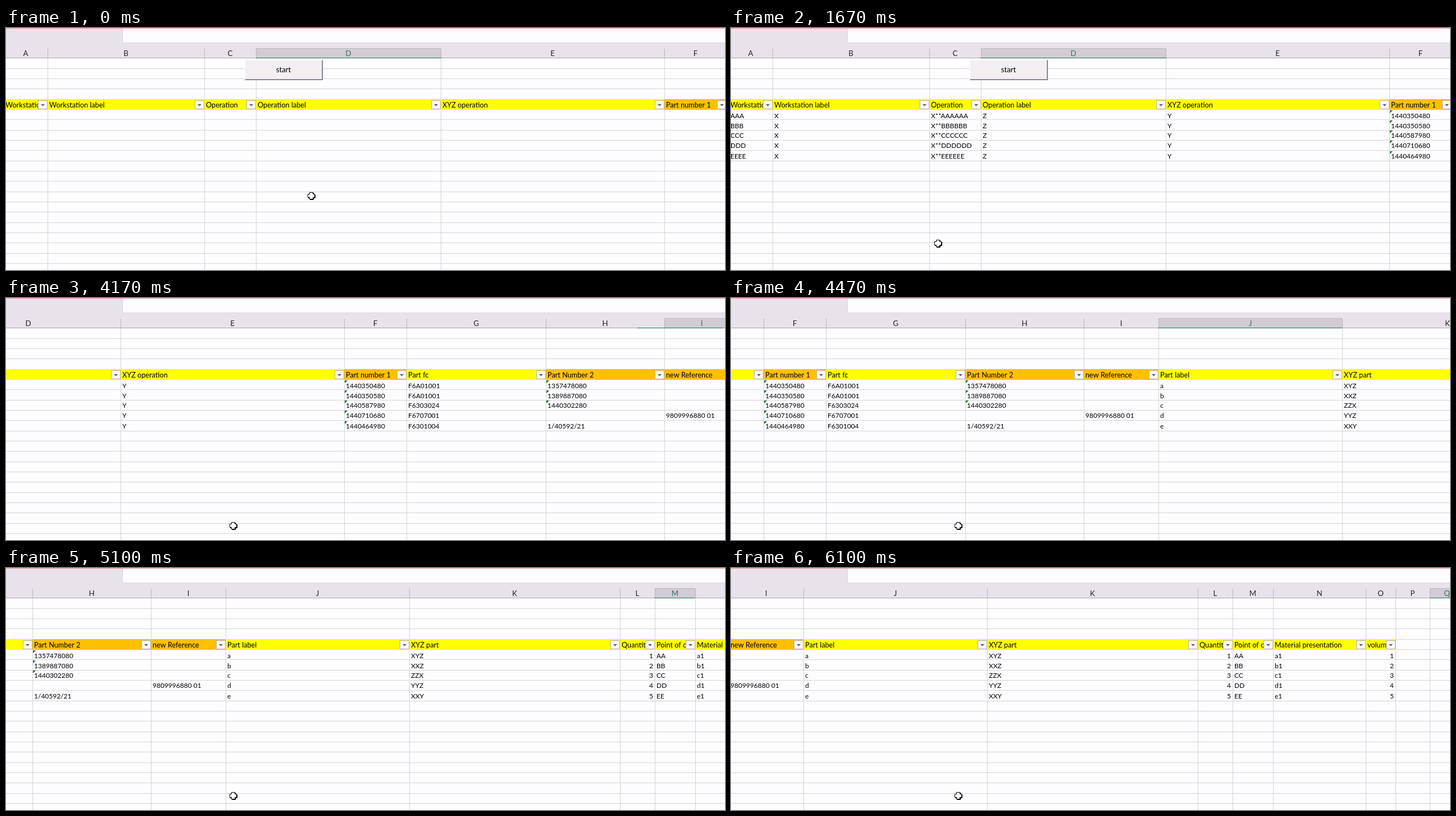
Animation, 1280 px wide and 432 px high, one loop 7090 ms. Source, as an HTML page with a canvas:

```html
<!DOCTYPE html>
<html lang="en">
<head>
<meta charset="utf-8">
<title>Worksheet</title>
<style>
html, body { margin: 0; width: 100%; height: 100%; overflow: hidden; background: #fdfcff; }
canvas { display: block; width: 1280px; height: 432px; }
</style>
</head>
<body>
<canvas id="stage" width="1280" height="432"></canvas>
<script>
const ctx = document.getElementById('stage').getContext('2d');
const W = 1280, H = 432, LOOP = 7090;
const FONT = 'Lato, Carlito, "Open Sans", sans-serif';
const YELLOW = '#ffff00', ORANGE = '#ffc000', PAPER = '#fdfcff', GRID = '#d8d2da';

// Left edges of columns A..Q, plus the end of Q
const edges = [-4, 74, 353, 445, 774, 1172, 1283, 1531, 1742, 1875, 2202, 2577, 2639, 2711, 2876, 2929, 2990, 3051];

const columns = [
  { title: 'Workstation', cells: ['AAA', 'BBB', 'CCC', 'DDD', 'EEEE'] },
  { title: 'Workstation label', cells: Array(5).fill('X') },
  { title: 'Operation', cells: [...'ABCDE'].map(c => 'X**' + c.repeat(6)) },
  { title: 'Operation label', cells: Array(5).fill('Z') },
  { title: 'XYZ operation', cells: Array(5).fill('Y') },
  { title: 'Part number 1', orange: true, flags: 5,
    cells: ['1440350480', '1440350580', '1440587980', '1440710680', '1440464980'] },
  { title: 'Part fc', cells: ['F6A01001', 'F6A01001', 'F6303024', 'F6707001', 'F6301004'] },
  { title: 'Part Number 2', orange: true, flags: 3,
    cells: ['1357478080', '1389887080', '1440302280', '', '1/40592/21'] },
  { title: 'new Reference', orange: true, cells: ['', '', '', '9809996880 01', ''] },
  { title: 'Part label', cells: [...'abcde'] },
  { title: 'XYZ part', cells: ['XYZ', 'XXZ', 'ZZX', 'YYZ', 'XXY'] },
  { title: 'Quantity', right: true, cells: [...'12345'] },
  { title: 'Point of consumption', cells: ['AA', 'BB', 'CC', 'DD', 'EE'] },
  { title: 'Material presentation', cells: [...'abcde'].map(c => c + '1') },
  { title: 'volume', right: true, cells: [...'12345'] }
];
const rowMid = [156, 174, 191, 209.5, 228];

// Times at which the selection steps one column right, starting from D
const FIRST = 3;
const keys = [3324, 3521, 3718, 3914, 4112.5, 4341, 4557, 4771, 4986, 5221, 5456, 5691, 5926];
const SELECT_MS = 150, SCROLL_MS = 280, VIEW = 1397, FILL_AT = 1000;

// Cursor stops: time, x, y
const path = [
  [30, 544, 300], [170, 541, 282], [330, 541, 282], [570, 492, 78], [1030, 492, 78],
  [1500, 473, 337], [1540, 473, 337], [1670, 369, 385], [1920, 369, 385],
  [2080, 367, 394], [2280, 394, 410], [2430, 405, 407]
];

const clamp = v => Math.max(0, Math.min(1, v));
const lerp = (a, b, p) => a + (b - a) * p;
const easeOut = p => 1 - Math.pow(1 - clamp(p), 3);
const smooth = p => p * p * (3 - 2 * p);

// Each step scrolls just enough whole columns to show the selected one
let lead = 0;
const scrolls = [];
keys.forEach((at, i) => {
  const before = lead, right = edges[FIRST + i + 2];
  while (right - edges[lead] - 4 > VIEW) lead++;
  if (lead !== before) scrolls.push({ at, to: edges[lead] + 4 });
});

function scrollAt(t) {
  let from = 0, to = 0, start = 0;
  for (const s of scrolls) {
    if (t < s.at) break;
    from = lerp(from, to, easeOut((s.at - start) / SCROLL_MS));
    to = s.to;
    start = s.at;
  }
  return Math.round(lerp(from, to, easeOut((t - start) / SCROLL_MS)));
}

function selectionAt(t) {
  const n = keys.filter(k => k <= t).length, col = FIRST + n;
  if (!n) return { col, left: edges[col], right: edges[col + 1] };
  const p = easeOut((t - keys[n - 1]) / SELECT_MS);
  return {
    col,
    left: Math.round(lerp(edges[col - 1], edges[col], p)),
    right: Math.round(lerp(edges[col], edges[col + 1], p))
  };
}

function cursorAt(t) {
  if (t <= path[0][0]) return path[0].slice(1);
  for (let i = 1; i < path.length; i++) {
    const [t0, x0, y0] = path[i - 1], [t1, x1, y1] = path[i];
    if (t < t1) {
      const p = smooth((t - t0) / (t1 - t0));
      return [lerp(x0, x1, p), lerp(y0, y1, p)];
    }
  }
  return path[path.length - 1].slice(1);
}

function rect(x, y, w, h, color) {
  ctx.fillStyle = color;
  ctx.fillRect(x, y, w, h);
}

function text(str, x, y, size, align = 'left', color = '#000') {
  ctx.font = size + 'px ' + FONT;
  ctx.textAlign = align;
  ctx.fillStyle = color;
  ctx.fillText(str, x, y);
}

function triangle(x0, y0, x1, y1, x2, y2, color) {
  ctx.beginPath();
  ctx.moveTo(x0, y0);
  ctx.lineTo(x1, y1);
  ctx.lineTo(x2, y2);
  ctx.fillStyle = color;
  ctx.fill();
}

function filterButton(right) {
  const x = right - 17;
  rect(x, 129, 17, 16, '#b3adb9');
  rect(x + 1, 130, 15, 14, '#fbf9fd');
  triangle(x + 5, 136, x + 12, 136, x + 8.5, 139.5, '#5b5760');
}

function drawGrid(scroll) {
  for (let k = 1; k <= 20; k++) rect(0, Math.floor(54 + k * 18.32), W, 1, GRID);
  for (const e of edges) rect(e - scroll, 54, 1, H - 54, GRID);
}

function drawColumn(col, i, scroll, filled) {
  const x = edges[i] - scroll, right = edges[i + 1] - scroll;
  if (right < 0 || x > W) return;
  rect(x, 127, right - x, 19, col.orange ? ORANGE : YELLOW);
  ctx.save();
  ctx.beginPath();
  ctx.rect(x, 127, right - x - 16, 19);
  ctx.clip();
  text(col.title, x + 3, 142, 12.7);
  ctx.restore();
  filterButton(right);
  if (!filled) return;
  col.cells.forEach((cell, r) => {
    if (col.right) text(cell, right - 3, rowMid[r] + 4.5, 12, 'right');
    else text(cell, x + 3, rowMid[r] + 4.5, 12);
    if (r < col.flags) {
      const y = Math.floor(146 + r * 18.32) + 1;
      triangle(x + 1, y, x + 6, y, x + 1, y + 5, '#117a22');
    }
  });
}

function drawStart(scroll) {
  const x = 425 - scroll;
  if (x < -140) return;
  rect(x, 57, 139, 36, '#6c6678');
  rect(x, 57, 138, 35, '#ffffff');
  rect(x + 1, 58, 137, 34, '#aaa4ae');
  rect(x + 1, 58, 136, 33, '#f2eef2');
  text('start', x + 69, 79, 13.3, 'center');
}

function drawHeader(scroll, sel) {
  rect(0, 0, W, 54, '#e8e3ea');
  rect(207, 1, W - 207, 26, '#d9d2e0');
  rect(208, 1, W - 208, 25, PAPER);
  rect(0, 0, W, 1, '#e58f90');
  rect(0, 53, W, 1, '#aaa4ac');
  for (let i = 0; i < edges.length - 1; i++) {
    const x = edges[i] - scroll, w = edges[i + 1] - edges[i];
    const on = i === sel.col;
    if (on) {
      rect(x, 36, w, 17, '#d2ccd4');
      rect(x, 36, w, 1, '#bdb7bf');
    }
    rect(x, 37, 1, 17, '#b9b2ba');
    text(String.fromCharCode(65 + i), x + w / 2, 49.5, 13.3, 'center', on ? '#3c6e64' : '#242226');
  }
  rect(sel.left - scroll, 53, sel.right - sel.left + 1, 1, '#217055');
}

function plus(x, y) {
  const a = 3, b = 6;
  ctx.beginPath();
  [[-a, -b], [a, -b], [a, -a], [b, -a], [b, a], [a, a],
   [a, b], [-a, b], [-a, a], [-b, a], [-b, -a], [-a, -a]]
    .forEach(([dx, dy]) => ctx.lineTo(x + dx, y + dy));
  ctx.closePath();
}

function drawCursor(x, y) {
  x = Math.round(x) - 0.5;
  y = Math.round(y) - 0.5;
  ctx.lineWidth = 1;
  ctx.strokeStyle = ctx.fillStyle = '#000';
  plus(x + 1, y + 1);
  ctx.fill();
  ctx.stroke();
  plus(x, y);
  ctx.fillStyle = '#fff';
  ctx.fill();
  ctx.stroke();
}

function draw(t) {
  const scroll = scrollAt(t), sel = selectionAt(t);
  rect(0, 0, W, H, PAPER);
  drawGrid(scroll);
  columns.forEach((col, i) => drawColumn(col, i, scroll, t >= FILL_AT));
  drawStart(scroll);
  drawHeader(scroll, sel);
  drawCursor(...cursorAt(t));
}

const begin = performance.now();
function tick() {
  draw((performance.now() - begin) % LOOP);
  requestAnimationFrame(tick);
}
tick();
</script>
</body>
</html>
```
